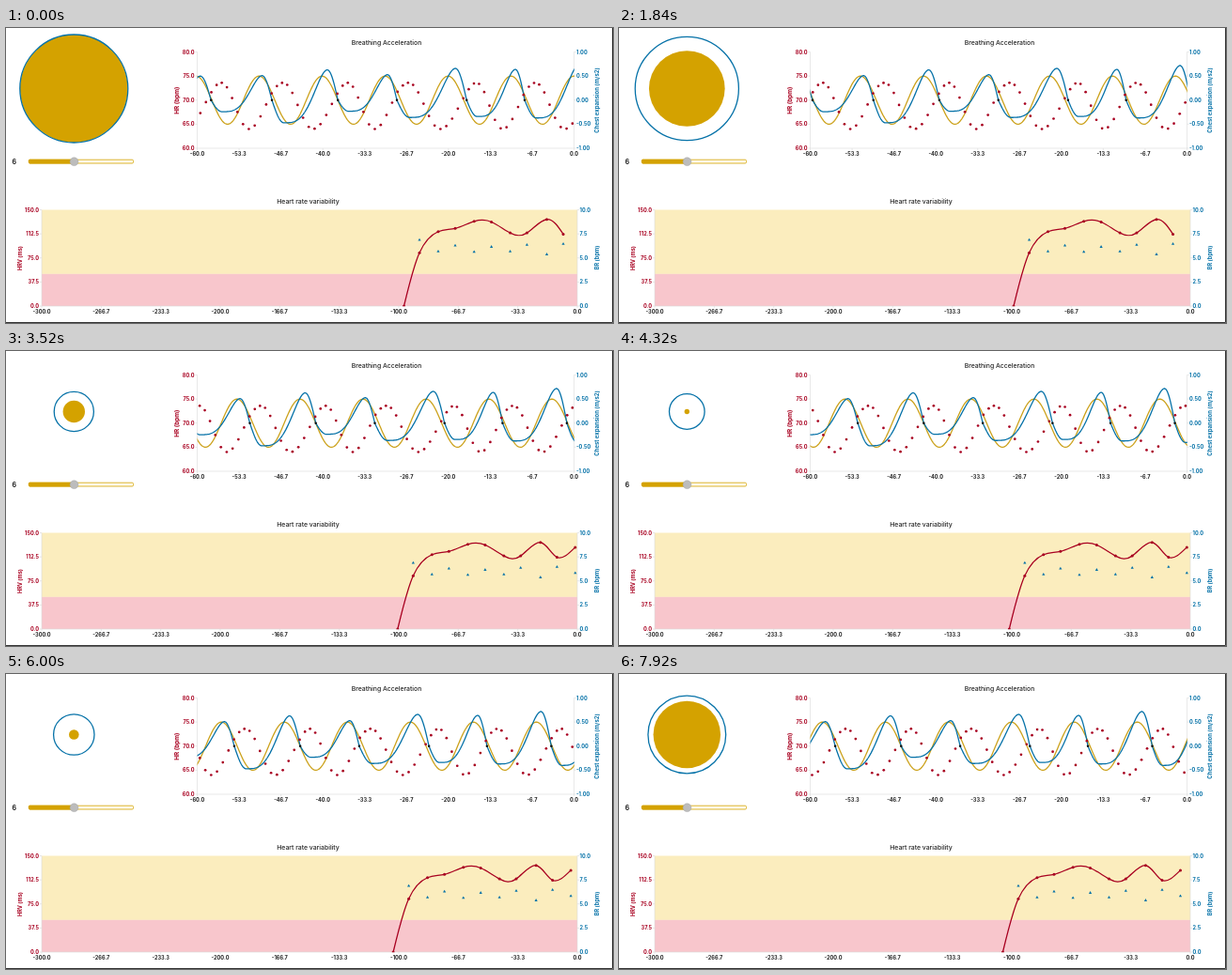
An HTML page for the animation above (8000 ms loop, 646 by 314 pixels).

```html
<!DOCTYPE html>
<html lang="en">
<head>
<meta charset="utf-8">
<title>Breathing pacer</title>
<style>
  html, body { margin: 0; width: 100%; height: 100%; overflow: hidden; background: #fff; }
  svg { display: block; width: 100vw; height: 100vh; }
  text { font-family: Inter, "Liberation Sans", Arial, sans-serif; font-size: 5.6px; font-weight: 700; fill: #222; }
  .title { font-size: 6.85px; font-weight: 500; }
  .red { fill: #a80020; }
  .blue { fill: #0672a8; }
  .line { fill: none; stroke-width: 1.3; stroke-linejoin: round; }
</style>
</head>
<body>
<svg viewBox="0 0 646 314">
  <defs>
    <clipPath id="topClip"><rect x="203.5" y="25" width="401.3" height="103.5"/></clipPath>
    <clipPath id="lowClip"><rect x="38" y="193" width="570.3" height="103.3"/></clipPath>
  </defs>
  <rect width="646" height="314" fill="#fff"/>
  <circle id="pacer" cx="72.3" cy="64.5" fill="#d4a200"/>
  <circle id="chest" cx="72.3" cy="64.5" fill="none" stroke="#0672a8" stroke-width="1.3"/>

  <text x="6.5" y="144.6" style="font-size:7px">6</text>
  <rect x="24.3" y="140.2" width="111.2" height="3.8" rx="1.2" fill="#fffbe9" stroke="#d4a200" stroke-width=".8"/>
  <rect x="24" y="139.8" width="48" height="4.6" rx="1.4" fill="#d4a200"/>
  <circle cx="72.5" cy="142.2" r="4.4" fill="#bcbcbc" stroke="#a2a2a2" stroke-width=".5"/>

  <rect x="38" y="193.5" width="570" height="68.4" fill="#fbedbe"/>
  <rect x="38" y="261.8" width="570" height="34.2" fill="#f8c6cc"/>
  <g id="axes"></g>
  <g clip-path="url(#topClip)"><g id="upper"></g></g>
  <g clip-path="url(#lowClip)"><g id="lower"></g></g>
  <path d="M645.5 0V313.5H0" fill="none" stroke="#333"/>
</svg>
<script>
const LOOP = 8000, STEP = 80;
const $ = id => document.getElementById(id);
const axes = $("axes"), upper = $("upper"), lower = $("lower");

// Chart scales: seconds to x, values to y
const SPEED = 401 / 60, LOW_SPEED = 1.9;
const topX = s => 604.5 + SPEED * s;
const lowX = s => 608 + LOW_SPEED * s;
const chestY = v => 76.8 - 51.2 * v;
const rateY = bpm => 25.5 + 5.125 * (80 - bpm);
const hrvY = ms => 296 - 102.5 * ms / 150;
const breathY = bpm => 296 - 10.25 * bpm;

// Each breath: end time (s), variability (ms), chest peak before it, trough after it
const breaths = [
  [-97.1, 0], [-88.4, 83], [-77.9, 116],
  [-68.4, 121, .5, .3], [-57.8, 132, .5, .24], [-48.1, 131, .51, .47], [-37.6, 114, .63, .23],
  [-28.2, 114, .53, .36], [-17.1, 135, .66, .34], [-7.86, 112, .64, .37], [2.38, 127.5, .72, .4],
  [11.6, 120, .65, .4]];
const shown = breaths.slice(0, -1);

function add(parent, tag, attrs, text) {
  const el = document.createElementNS("http://www.w3.org/2000/svg", tag);
  for (const k in attrs) el.setAttribute(k, attrs[k]);
  if (text) el.textContent = text;
  parent.appendChild(el);
  return el;
}

// Breath under way at time s, and how far through it we are (0..1)
function phase(s) {
  const i = breaths.findIndex(b => b[0] > s);
  const from = breaths[i - 1], to = breaths[i];
  return { from, to, u: (s - from[0]) / (to[0] - from[0]) };
}

// Quick fall to the trough, slow start of the rise, quick fall from the peak
function chest(s) {
  const { from, to, u } = phase(s), peak = to[2], trough = from[3];
  if (u < .18) return -trough * Math.sin(Math.PI / 2 * u / .18);
  if (u > .84) return peak * Math.cos(Math.PI / 2 * (u - .84) / .16);
  const w = ((u - .18) / .66) ** 1.7;
  return -trough + (peak + trough) * w * w * (3 - 2 * w);
}

// Heart rate peaks just after each breath and falls faster than it rises
function heartRate(s) {
  const u = (phase(s).u + .83) % 1;
  const turn = u < .45 ? u / .9 : .5 + (u - .45) / 1.1;
  return 68.8 + 4.8 * Math.cos(2 * Math.PI * turn);
}

const pace = s => Math.cos(2 * Math.PI * s / 10.03);

// Path of a function of time across the upper chart
function trace(f) {
  let d = "";
  for (let s = -60.4; s < 8.5; s += .15)
    d += (d ? "L" : "M") + topX(s).toFixed(2) + " " + chestY(f(s)).toFixed(2);
  return d;
}

// Natural cubic spline through points
function spline(p) {
  const n = p.length - 1, d = p.map(() => [0, 0]);
  for (let pass = 0; pass < 25; pass++)
    for (let i = 0; i <= n; i++)
      for (let k = 0; k < 2; k++) {
        const a = Math.max(i - 1, 0), b = Math.min(i + 1, n);
        const near = (i > 0 ? d[a][k] : 0) + (i < n ? d[b][k] : 0);
        d[i][k] = (3 * (p[b][k] - p[a][k]) - near) / (i > 0 && i < n ? 4 : 2);
      }
  let path = "M" + p[0];
  for (let i = 0; i < n; i++) {
    const c1 = p[i].map((v, k) => v + d[i][k] / 3);
    const c2 = p[i + 1].map((v, k) => v - d[i + 1][k] / 3);
    path += `C${c1} ${c2} ${p[i + 1]}`;
  }
  return path;
}

// Axes
function label(x, y, text, cls, anchor) {
  add(axes, "text", { x, y, class: cls, "text-anchor": anchor }, text);
}
function sideTitle(x, y, size, text, cls) {
  add(axes, "text", { transform: `translate(${x} ${y}) rotate(-90)`, class: cls,
    "text-anchor": "middle", style: `font-size:${size}px` }, text);
}
function chart(x0, x1, y0, y1, left, right, span) {
  let marks = `M${x0} ${y0}V${y1}H${x1}V${y0}`;
  for (let i = 0; i <= 4; i++) {
    const y = y0 + (y1 - y0) * i / 4;
    marks += `M${x0 - 2} ${y}h2M${x1} ${y}h2`;
    label(x0 - 3, y + 2, left(i), "red", "end");
    label(x1 + 2.5, y + 2, right(i), "blue", "start");
  }
  for (let i = 0; i <= 9; i++) {
    const x = x0 + (x1 - x0) * i / 9;
    marks += `M${x} ${y1}v2`;
    label(x, y1 + 8.2, (i < 9 ? "-" : "") + (span * (9 - i) / 9).toFixed(1), "", "middle");
  }
  add(axes, "path", { d: marks, fill: "none", stroke: "#dadada", "stroke-width": .6 });
}
chart(203.5, 604.5, 25.5, 128, i => (80 - 5 * i).toFixed(1), i => (1 - i / 2).toFixed(2), 60);
chart(38, 608, 193.5, 296, i => (150 - 37.5 * i).toFixed(1), i => (10 - 2.5 * i).toFixed(1), 300);
label(405, 18.2, "Breathing Acceleration", "title", "middle");
label(321.5, 186.5, "Heart rate variability", "title", "middle");
sideTitle(184, 77.2, 6.4, "HR (bpm)", "red");
sideTitle(630.5, 77, 5.95, "Chest expansion (m/s2)", "blue");
sideTitle(16.5, 245, 5.6, "HRV (ms)", "red");
sideTitle(630.5, 244.5, 5.7, "BR (bpm)", "blue");

// Upper chart, drawn once and scrolled
add(upper, "path", { d: trace(s => pace(s) / 2), class: "line", stroke: "#cca21c" });
add(upper, "path", { d: trace(chest), class: "line", stroke: "#0672a8" });
for (let s = -59.5; s < 8; s += 60 / heartRate(s))
  add(upper, "circle", { cx: topX(s), cy: rateY(heartRate(s)), r: 1.35, class: "red" });
for (const [s] of shown)
  add(upper, "circle", { cx: topX(s), cy: chestY(0), r: 1.25, fill: "#111" });

// Lower chart; breath rate follows from the gap between breaths
const points = shown.map(([s, ms]) => [lowX(s), hrvY(ms)]);
const curves = [spline(points.slice(0, -1)), spline(points)];
const curve = add(lower, "path", { class: "line", stroke: "#a80020" });
let newest;
points.forEach(([x, y], i) => {
  newest = add(lower, "g", {});
  add(newest, "circle", { cx: x, cy: y, r: 1.5, class: "red" });
  if (!i) return;
  const top = breathY(60 / (shown[i][0] - shown[i - 1][0])) - 1.5;
  add(newest, "path", { d: `M${x} ${top}l1.6 2.8h-3.2z`, class: "blue" });
});
const arrival = shown[shown.length - 1][0];

function draw(ms) {
  const s = Math.floor(ms % LOOP / STEP) * STEP / 1000;
  const arrived = s >= arrival;
  upper.setAttribute("transform", `translate(${-SPEED * s} 0)`);
  lower.setAttribute("transform", `translate(${-LOW_SPEED * s} 0)`);
  curve.setAttribute("d", curves[+arrived]);
  newest.setAttribute("visibility", arrived ? "visible" : "hidden");
  $("pacer").setAttribute("r", 28.7 * (1 + pace(s)));
  $("chest").setAttribute("r", Math.min(57.5, 38 + 48 * chest(s)));
}

const start = performance.now();
function tick() {
  draw(performance.now() - start);
  requestAnimationFrame(tick);
}
tick();
</script>
</body>
</html>
```
